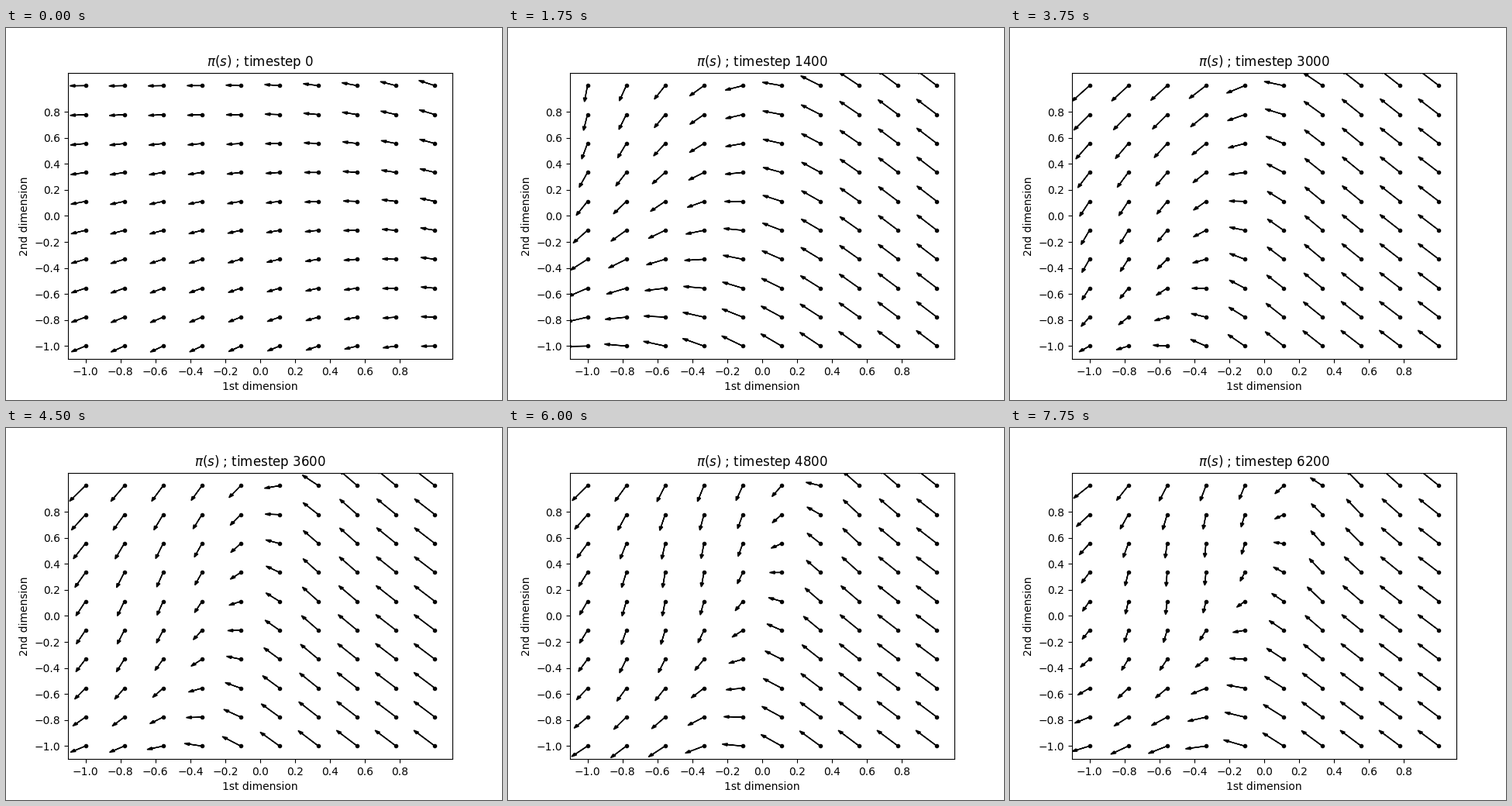
These frames come from a looping animation (640 px wide and 480 px high, 8 s). A matplotlib script:

```python
import numpy as np
import matplotlib.pyplot as plt
from matplotlib.animation import FuncAnimation

FRAMES, INTERVAL, STEP = 32, 250, 200
REACH = 0.1  # arrow length of a full action, in data units

axis = np.linspace(-1, 1, 10)
X, Y = (g.ravel() for g in np.meshgrid(axis, axis))


def bump(t, center, width):
    return np.exp(-((t - center) / width) ** 2)


def squash(a, b, c, d, e, f):
    """Bounded action: a quadratic of the state passed through tanh."""
    return np.tanh(a + b * X + c * Y + d * X * Y + e * X**2 + f * Y**2)


def horizontal(t):
    return squash(
        -0.45 - 0.75 * bump(t, 1.9, 1.2),
        -1.3 * (1 - np.exp(-t / 2.5)),
        0.15 * t - 0.1 + 0.5 * bump(t, 1.1, 0.6) - 0.45 * bump(t, 2.6, 0.8),
        0.13 * t - 0.63 * bump(t, 1.4, 0.85),
        -0.55 - 0.45 * np.tanh((t - 3) / 0.7),
        -0.1 * t - 0.03 - 0.25 * bump(t, 1.2, 0.7))


def vertical(t):
    return squash(
        0.17 - 0.28 * np.cos(2 * np.pi * t / 5),
        0.15 + 3 * np.tanh((t / 2.2) ** 1.4),
        -0.75 + 0.9 * np.exp(-t) + 0.5 * bump(t, 2.2, 0.6),
        0.45 * np.sin(2 * np.pi * t / 7.6),
        1.3 + 1.25 * np.tanh((t - 3.1) / 1.6),
        0.2 * np.sin(2 * np.pi * t / 7.2))


fig, ax = plt.subplots(figsize=(6.4, 4.8), dpi=100)
ax.set(xlim=(-1.1, 1.1), ylim=(-1.1, 1.1),
       xlabel="1st dimension", ylabel="2nd dimension")
ticks = np.arange(-5, 5) / 5
ax.set_xticks(ticks)
ax.set_yticks(ticks)
title = ax.set_title("")

ax.plot(X, Y, "k.")
arrows = [ax.arrow(x, y, -REACH, 0, head_width=0.02, head_length=0.03,
                   fc="k", ec="k") for x, y in zip(X, Y)]


def draw(frame):
    step = frame * STEP
    t = step / 1000
    title.set_text(rf"$\pi(s)$ ; timestep {step}")
    for arrow, u, v in zip(arrows, horizontal(t), vertical(t)):
        arrow.set_data(dx=REACH * u, dy=REACH * v)
    return [title, *arrows]


anim = FuncAnimation(fig, draw, frames=FRAMES, interval=INTERVAL,
                     repeat=True, repeat_delay=0)
plt.show()
```
